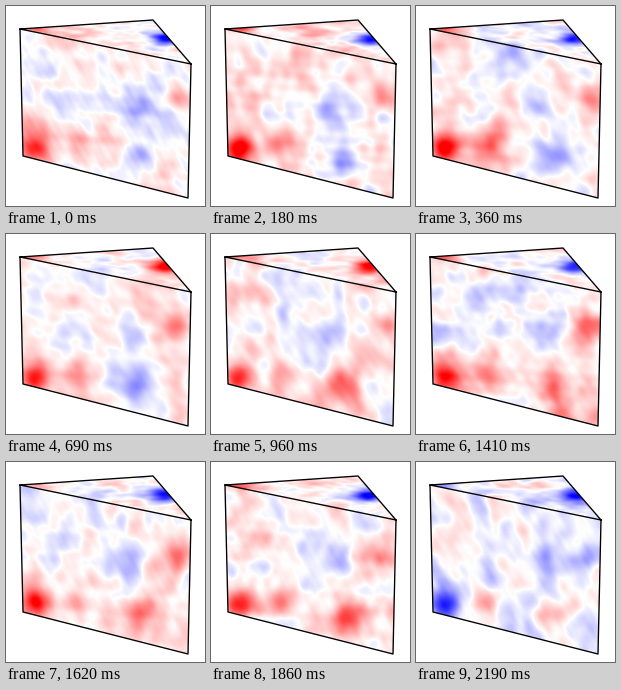
These frames come from a looping animation (199 px wide and 200 px high, 2.22 s). A matplotlib script:

```python
import numpy as np
import matplotlib.pyplot as plt
from matplotlib.animation import FuncAnimation
from matplotlib.patches import Polygon

W, H, DPI = 199, 200, 100
FRAMES, INTERVAL = 74, 30
MODES = 300
NOISE, RHO = 0.1, 0.6
LEFT, BACK, RIGHT = (14, 23), (147, 14), (185, 58)
BOTTOM_RIGHT, BOTTOM_LEFT = (182, 192), (17, 150)

# Centre x, y, radius, amplitude, and the samples at which the sign flips
FRONT_SPOTS = [
    (29, 142, 10, .90, [68]),
    (173, 93, 9, .45, [68]),
    (70, 139, 10, .38, []),
    (126, 99, 12, -.38, []),
    (136, 152, 12, -.45, [28]),
]
TOP_SPOTS = [
    (159, 33, 11, -1, [18, 40]),
    (26, 23, 13, .50, [68]),
]

rng = np.random.default_rng(11)
py, px = np.mgrid[0:H, 0:W] + 0.5

# Front face: a diagonal cut through the block, seen in perspective
u = (px - LEFT[0]) / (RIGHT[0] - LEFT[0])
top_edge = LEFT[1] + (RIGHT[1] - LEFT[1]) * u
depth = (py - top_edge) / (127 + 7 * u)
is_top = depth < 0

# Top face: right triangle with its corner at BACK
axes = np.array([np.subtract(BACK, LEFT), np.subtract(RIGHT, BACK)]).T
flat = np.stack([px.ravel() - LEFT[0], py.ravel() - LEFT[1]])
top_x, top_y = (np.linalg.inv(axes) @ flat).reshape(2, H, W)

block = np.stack([
    np.where(is_top, top_x, u).ravel(),
    np.where(is_top, top_y, u).ravel(),
    np.where(is_top, 0, depth).ravel(),
], axis=1)

# Random Fourier modes, shared by both faces so that they meet at the edge
length = np.exp(rng.uniform(np.log(.03), np.log(.16), MODES))
wave = rng.normal(size=(3, MODES)) / length
phase = rng.uniform(0, 2 * np.pi, MODES)
strength = np.sqrt(length / length.mean()) * np.sqrt(2 / MODES)
basis = (np.cos(block @ wave + phase) * strength).astype(np.float32)

# Correlated chain of samples
weights = rng.normal(size=(FRAMES, MODES)).astype(np.float32)
for n in range(1, FRAMES):
    weights[n] = RHO * weights[n - 1] + np.sqrt(1 - RHO**2) * weights[n]


def bump(x, y, radius, mask, flatten):
    dx, dy = (px - x) / radius, (py - y) / (radius * flatten)
    return mask * np.exp(-(dx**2 + dy**2) / 2)


spots = [(bump(x, y, r, mask, flatten), amp, flips)
         for group, mask, flatten in [(FRONT_SPOTS, ~is_top, 1.05),
                                      (TOP_SPOTS, is_top, .42)]
         for x, y, r, amp, flips in group]


def sign(n, flips):
    return (-1) ** sum(n >= flip for flip in flips)


def field(n):
    noise = NOISE * (basis @ weights[n]).reshape(H, W)
    # The overall tint follows the corner spot
    tint = .05 * sign(n, FRONT_SPOTS[0][-1])
    return tint + noise + sum(sign(n, flips) * amp * shape
                              for shape, amp, flips in spots)


fig = plt.figure(figsize=(W / DPI, H / DPI), dpi=DPI, facecolor="white")
ax = fig.add_axes([0, 0, 1, 1])
ax.axis("off")
image = ax.imshow(field(0), cmap="bwr", vmin=-1, vmax=1,
                  extent=(0, W, H, 0), aspect="auto", interpolation="nearest")
ax.set(xlim=(0, W), ylim=(H, 0))

outline = [LEFT, BACK, RIGHT, BOTTOM_RIGHT, BOTTOM_LEFT]
image.set_clip_path(Polygon(outline, transform=ax.transData))
ax.plot(*zip(*outline, LEFT, RIGHT), color="black", lw=1.35 * 72 / DPI,
        solid_joinstyle="round")


def update(n):
    image.set_data(field(n))
    return [image]


anim = FuncAnimation(fig, update, frames=FRAMES, interval=INTERVAL,
                     repeat=True, repeat_delay=0)
plt.show()
```
